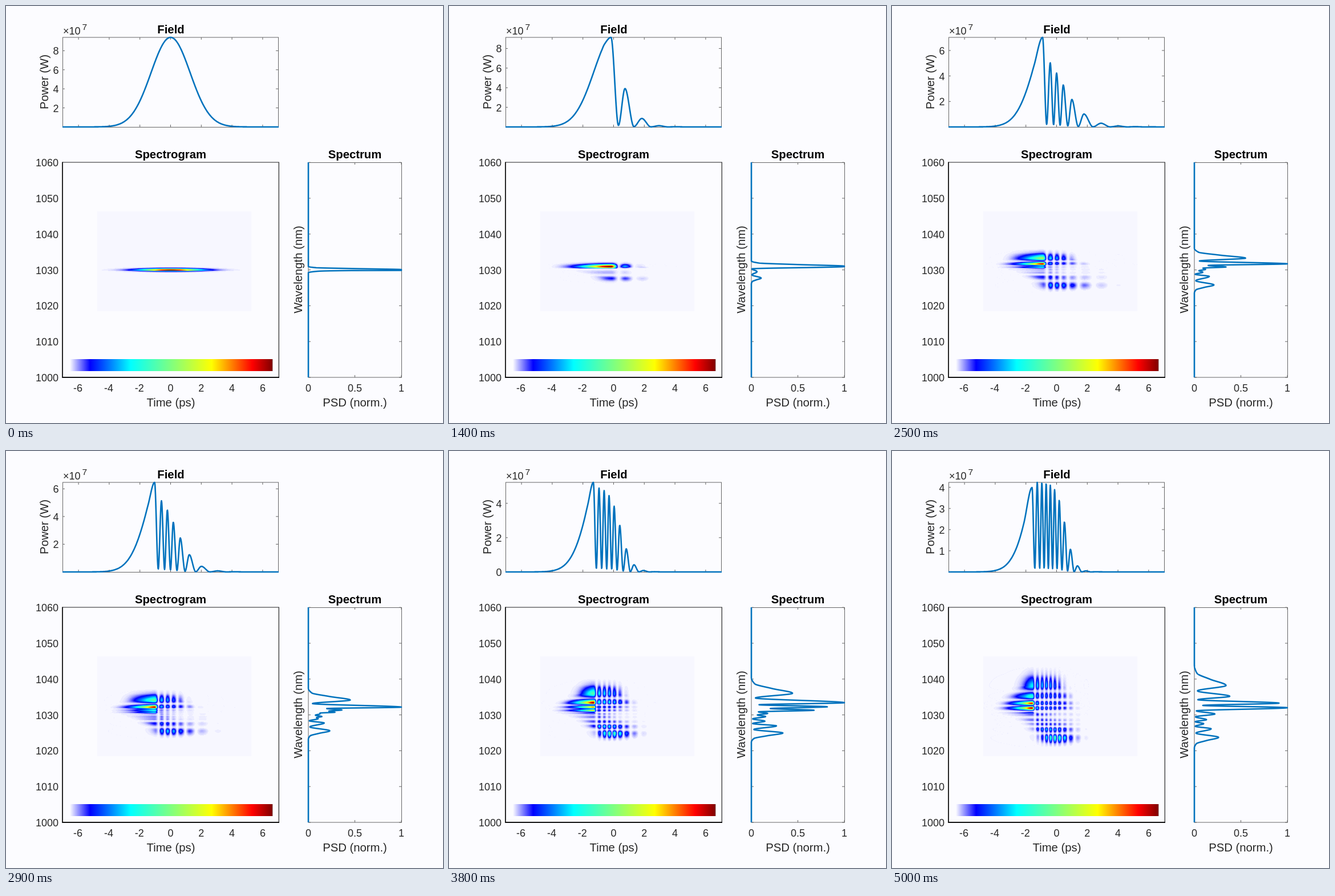
An HTML page with a canvas that plays this animation: 766 px wide and 731 px high, repeating every 5050 ms.

```html
<!DOCTYPE html>
<html lang="en">
<head>
<meta charset="utf-8">
<title>Pulse propagation</title>
<style>
  html, body { margin: 0; width: 100%; height: 100%; overflow: hidden; background: #fcfcff; }
  canvas, svg { position: absolute; left: 0; top: 0; }
  text { font: 18px "Liberation Sans", Arial, sans-serif; fill: #262626; }
  .mid { text-anchor: middle; }
  .end { text-anchor: end; }
  .label { font-size: 20.3px; text-anchor: middle; }
  .title { font-size: 20.3px; font-weight: bold; text-anchor: middle; fill: #000; }
  .thin { fill: none; stroke: #666; stroke-width: 1; }
  .curve { fill: none; stroke: #0072bd; stroke-width: 2.6; stroke-linejoin: round; }
</style>
</head>
<body>
<canvas id="map" width="766" height="731"></canvas>
<svg width="766" height="731" viewBox="0 0 766 731">
  <defs><linearGradient id="jet"></linearGradient></defs>
  <rect x="112" y="619" width="355" height="21" fill="url(#jet)"/>
  <path d="M467.5 619V640" stroke="#bbb" fill="none"/>
  <rect class="thin" x="99.5" y="55" width="378" height="157.5"/>
  <rect class="thin" x="530" y="274.5" width="163.5" height="376.5"/>
  <path d="M99 274H478.3V651" fill="none" stroke="#222" stroke-width="1.2"/>
  <path d="M99 273.5V651H479" fill="none" stroke="#111" stroke-width="1.8"/>
  <path id="ticks" class="thin"/>
  <path id="powerTicks" class="thin"/>
  <g id="labels"></g>
  <g id="powerLabels"></g>
  <path id="field" class="curve"/>
  <path id="spectrum" class="curve"/>
  <text class="title" x="289" y="48">Field</text>
  <text class="title" x="288.5" y="267">Spectrogram</text>
  <text class="title" x="611.5" y="267">Spectrum</text>
  <text x="100" y="50">×10</text>
  <text x="133.5" y="42" style="font-size:15.5px">7</text>
  <text class="label" x="289" y="702">Time (ps)</text>
  <text class="label" x="611.5" y="702">PSD (norm.)</text>
  <text class="label" transform="translate(74 133) rotate(-90)">Power (W)</text>
  <text class="label" transform="translate(519 462) rotate(-90)">Wavelength (nm)</text>
</svg>
<script>
const $ = id => document.getElementById(id);
const clamp = v => Math.min(1, Math.max(0, v));
const smooth = (a, b, v) => { v = clamp((v - a) / (b - a)); return v * v * (3 - 2 * v); };
const mix = (a, b, f) => a + (b - a) * f;
const sigmoid = v => 1 / (1 + Math.exp(-v));

const LOOP = 5050, STEP = 50;
const STOPS = [[0, '#fcfcff'], [.1, '#0000ff'], [.3, '#00ffff'],
               [.7, '#ffff00'], [.9, '#ff0000'], [1, '#800000']];

// front: first peak; gap, centre, spread: peak spacing; height, edge, width: fall of the peaks
const PULSES = [
  { time: 1400, front: 284, gap: 24.5, centre: 0, spread: 5, height: 9.2, edge: 304, width: 15 },
  { time: 2500, front: 264, gap: 11, centre: 1.3, spread: 1.4, height: 7.1, edge: 297, width: 22 },
  { time: 3300, front: 257, gap: 9.3, centre: 1.6, spread: .35, height: 5.3, edge: 300, width: 11 },
  { time: 4250, front: 249.5, gap: 8, centre: 2.4, spread: .28, height: 4.7, edge: 302, width: 8.5 },
  { time: 5000, front: 245.5, gap: 7.3, centre: 3, spread: .2, height: 4.25, edge: 304, width: 8 }
];

// Spectral peaks, outermost inward: y, height
const padded = (list, n) => [...list, ...Array(n - list.length).fill(list.at(-1))];
const spectrumKey = (time, red, blue) => ({ time, red: padded(red, 5), blue: padded(blue, 4) });
const SPECTRA = [
  spectrumKey(0, [[462, 1]], [[462, 1]]),
  spectrumKey(650, [[459.5, .45], [462, 1]], [[464.5, .45], [462, 1]]),
  spectrumKey(1400, [[456, 1]], [[477, .105], [465.5, .06]]),
  spectrumKey(2500, [[442, .55], [452, 1], [457.5, .34], [461.5, .12]],
    [[489, .21], [474, .16], [466.5, .09]]),
  spectrumKey(3300, [[431, .35], [446, 1], [450.5, .38], [454.5, .45], [460, .13]],
    [[492, .25], [479.5, .18], [472, .12], [464.5, .2]]),
  spectrumKey(4250, [[419, .41], [437, .74], [446.5, 1], [454.5, .7], [460, .17]],
    [[496.5, .33], [484, .28], [475, .13], [466.5, .07]]),
  spectrumKey(5000, [[411, .34], [430, .38], [442, .91], [450, 1], [461, .22]],
    [[502, .26], [487, .18], [478, .1], [471, .13]])
];

function blend(a, b, f) {
  if (Array.isArray(a)) return a.map((v, i) => blend(v, b[i], f));
  if (typeof a === 'number') return mix(a, b, f);
  return Object.fromEntries(Object.keys(a).map(k => [k, blend(a[k], b[k], f)]));
}

function poseAt(keys, time) {
  let i = 0;
  while (i < keys.length - 2 && time > keys[i + 1].time) i++;
  const a = keys[i], b = keys[i + 1];
  return blend(a, b, clamp((time - a.time) / (b.time - a.time)));
}

// Monotone cubic through the points, sampled from start to end
function sampleCurve(points, start, end, step) {
  const n = points.length, p = points.map(q => q.slice());
  for (let i = 1; i < n; i++) p[i][0] = Math.max(p[i][0], p[i - 1][0] + .1);
  const h = [], d = [], m = new Array(n).fill(0), out = [];
  for (let i = 0; i < n - 1; i++) {
    h[i] = p[i + 1][0] - p[i][0];
    d[i] = (p[i + 1][1] - p[i][1]) / h[i];
  }
  for (let i = 1; i < n - 1; i++) {
    if (d[i - 1] * d[i] <= 0) continue;
    const w1 = 2 * h[i] + h[i - 1], w2 = h[i] + 2 * h[i - 1];
    m[i] = (w1 + w2) / (w1 / d[i - 1] + w2 / d[i]);
  }
  for (let x = start, i = 0; x <= end; x += step) {
    while (i < n - 2 && x > p[i + 1][0]) i++;
    const u = clamp((x - p[i][0]) / h[i]), w = 1 - u;
    out.push(p[i][1] * w * w * (1 + 2 * u) + p[i + 1][1] * u * u * (3 - 2 * u)
      + h[i] * u * w * (m[i] * w - m[i + 1] * u));
  }
  return out;
}

const gauss = x => 9.4 * Math.exp(-(((x - 288.5) / 48.4) ** 2));

function fieldAt(time) {
  const p = poseAt(PULSES, time);
  const front = p.front + Math.max(0, 1400 - Math.max(time, 1050)) * .015;
  const peaks = [[front, gauss(front) * mix(.98, .935, clamp((time - 1400) / 3600))]];
  for (let k = 0, x = front; k < 11; k++) {
    x += Math.min(30, p.gap + p.spread * (k - p.centre) ** 2);
    peaks.push([x, p.height * sigmoid((p.edge - x) / p.width)]);
  }
  const points = [];
  for (let x = 99; x < front - 9; x += 6) points.push([x, gauss(x)]);
  peaks.forEach(([x, v], i) => {
    points.push([x, v]);
    const next = peaks[i + 1];
    if (next) points.push([mix(x, next[0], .53), .04 * Math.min(v, next[1])]);
  });
  points.push([peaks.at(-1)[0] + 20, 0], [900, 0]);
  const depletion = smooth(950, 1300, time);
  const power = sampleCurve(points, 99, 478, .5)
    .map((v, i) => mix(gauss(99 + i / 2), v, depletion));
  return { power, max: Math.max(...power), front, notch: mix(front, peaks[1][0], .53) };
}

function spectrumAt(time) {
  const { red, blue } = poseAt(SPECTRA, time);
  const tail = ([y, v], w) => [[y - w, 0], [y - .6 * w, .08 * v], [y - .3 * w, .5 * v]];
  const peaks = [...red, ...blue.slice().reverse()];
  const points = [[270, 0], ...tail(red[0], 5.5 + .6 * (462 - red[0][0]))];
  peaks.forEach(([y, v], i) => {
    points.push([y, v]);
    const next = peaks[i + 1];
    if (!next) return;
    const depth = clamp((next[0] - y - 3) / 4);
    points.push([(y + next[0]) / 2, Math.min(v, next[1]) * mix(1, .1, depth)]);
  });
  points.push(...tail(blue[0], -5.5 - .33 * (blue[0][0] - 462)).reverse(), [655, 0]);
  const raw = sampleCurve(points, 274, 651, .25), max = Math.max(...raw);
  return { psd: raw.map(v => v / max), top: red[0][0], bottom: blue[0][0] };
}

const X0 = 160, Y0 = 360, W = 270, H = 175;
const ctx = $('map').getContext('2d', { willReadFrequently: true });

// Colour ramp of 256 entries, read back from a painted gradient
function makePalette() {
  const ramp = ctx.createLinearGradient(0, 0, 256, 0);
  STOPS.forEach(([o, c]) => ramp.addColorStop(o, c));
  ctx.fillStyle = ramp;
  ctx.fillRect(0, 0, 256, 1);
  const { data } = ctx.getImageData(0, 0, 256, 1);
  ctx.clearRect(0, 0, 256, 1);
  return data;
}
const palette = makePalette();
const image = ctx.createImageData(W, H), level = new Float32Array(W * H);

function drawMap(time, field, spec) {
  const shaping = smooth(700, 1400, time), reach = clamp((time - 1400) / 2500);
  const tilt = 1.5 * smooth(0, 650, time) * (1 - smooth(650, 1400, time));
  let max = 0;
  for (let j = 0; j < H; j++) {
    const y = Y0 + j, red = y < 460;
    const d = clamp(red ? (462 - y) / Math.max(1, 462 - spec.top)
                        : (y - 462) / Math.max(1, spec.bottom - 462));
    const left = red ? 185 + 50 * d * d * reach : 190 + 80 * Math.sqrt(d);
    const right = field.front + 85 - 40 * d * d;
    const lead = red ? 1 : .3 + .7 * d;
    const trail = red ? .2 + .5 * smooth(.4, .9, d) : .5 + 1.4 * d;
    for (let i = 0; i < W; i++) {
      const x = X0 + i, u = (x - 288.5) / 34;
      const offset = tilt * u * Math.exp(.5 - u * u / 2);
      let v = field.power[(x - 99) * 2] / field.max
        * spec.psd[Math.round((y - offset - 274) * 4)];
      if (shaping && v > .002) {
        let mask = sigmoid((x - left) / 6) * mix(lead, trail, sigmoid((x - field.notch) / 1.5));
        if (red) mask *= sigmoid((right - x) / 6);
        mask *= 1 - .85 * Math.exp(-(((x - field.front - 50) / 30) ** 2) - ((y - 464) / 11) ** 2);
        v *= mix(1, mask, shaping);
      }
      level[j * W + i] = v;
      if (v > max) max = v;
    }
  }
  level.forEach((v, i) => {
    const k = Math.round(clamp(v / max) * 255) * 4;
    for (let c = 0; c < 4; c++) image.data[i * 4 + c] = palette[k + c];
  });
  ctx.putImageData(image, X0, Y0);
}

const label = (x, y, s, cls) => `<text class="${cls}" x="${x}" y="${y}">${s}</text>`;
const line = pts => 'M' + pts.map(p => p[0].toFixed(2) + ' ' + p[1].toFixed(2)).join('L');

function drawAxes() {
  let ticks = '', text = '';
  for (let t = -6; t <= 6; t += 2) {
    const x = 288.5 + t * 26.9;
    ticks += `M${x} 55v4M${x} 212v-4`;
    text += label(t < 0 ? x - 1 : x, 676, t, 'mid');
  }
  for (let i = 0; i <= 6; i++) {
    const y = 651 - i * 62.8;
    ticks += `M530 ${y}h4M693 ${y}h-4`;
    text += label(92, y + 7, 1000 + i * 10, 'end');
  }
  for (let v = 0; v <= 1; v += .5) {
    const x = 530 + v * 163;
    ticks += `M${x} 274v4M${x} 651v-4`;
    text += label(x, 676, v, 'mid');
  }
  $('ticks').setAttribute('d', ticks);
  $('labels').innerHTML = text;
  $('jet').innerHTML = STOPS.map(([o, c]) => `<stop offset="${o}" stop-color="${c}"/>`).join('');
}

function drawPowerAxis(max) {
  const step = max < 5 ? 1 : 2;
  let ticks = '', text = '';
  for (let v = max >= 5 && max < 6 ? 0 : step; v < max; v += step) {
    const y = 212 - v / max * 157;
    ticks += `M99 ${y}h4M477 ${y}h-4`;
    text += label(92.5, y + 7, v, 'end');
  }
  $('powerTicks').setAttribute('d', ticks);
  $('powerLabels').innerHTML = text;
}

function draw(time) {
  const field = fieldAt(time), spec = spectrumAt(time);
  drawPowerAxis(field.max);
  $('field').setAttribute('d', line(field.power.map((v, i) => [99 + i / 2, 212 - v / field.max * 157])));
  $('spectrum').setAttribute('d', line(spec.psd.map((v, i) => [530 + 163 * v, 274 + i / 4])));
  drawMap(time, field, spec);
}

let shown = -1;
function tick() {
  const time = Math.floor(performance.now() % LOOP / STEP) * STEP;
  if (time !== shown) draw(shown = time);
  requestAnimationFrame(tick);
}
drawAxes();
tick();
</script>
</body>
</html>
```
